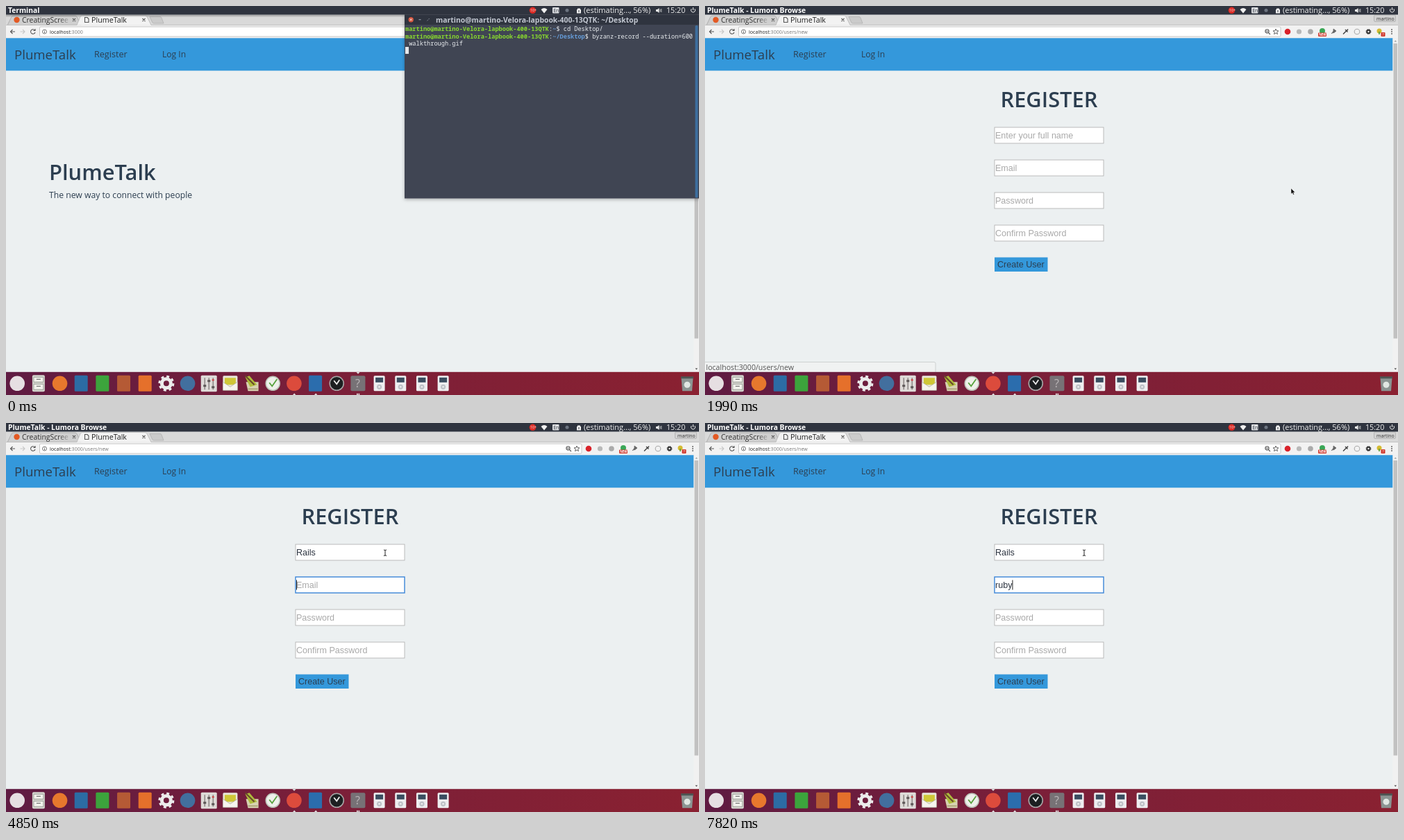
An HTML page for the animation above (8 s loop, 998 by 561 pixels).

```html
<!DOCTYPE html>
<html lang="en">
<head>
<meta charset="utf-8">
<title>Registration walkthrough</title>
<style>
  html, body { margin: 0; width: 100%; height: 100%; overflow: hidden; background: #ecf0f1; }
  svg { display: block; width: 100vw; height: 100vh; }
  text { font-family: "Open Sans", "Noto Sans", sans-serif; white-space: pre; }
  .form text { font: 12.55px "Liberation Sans", Arial, sans-serif; }
  .term text { font: 8.65px "Noto Sans Mono", "DejaVu Sans Mono", monospace; fill: #e8ecef; }
  .user { fill: #87d72f; font-weight: bold; }
  .path { fill: #659bd6; font-weight: bold; }
  .bold { font-weight: bold; }
  .semi { font-weight: 600; }
  .line { fill: none; stroke: #555; stroke-width: 1.1; }
</style>
</head>
<body>
<svg viewBox="0 0 998 561">
  <defs>
    <linearGradient id="dockFill">
      <stop offset="0" stop-color="#5f1b42"/><stop offset=".45" stop-color="#7a1f39"/><stop offset="1" stop-color="#8a2131"/>
    </linearGradient>
    <linearGradient id="tabFade" gradientUnits="userSpaceOnUse" x1="76" x2="93" y1="0" y2="0">
      <stop offset="0" stop-color="#333"/><stop offset="1" stop-color="#333" stop-opacity="0"/>
    </linearGradient>
    <linearGradient id="panelShade" x2="0" y2="1">
      <stop offset="0" stop-opacity=".3"/><stop offset="1" stop-opacity="0"/>
    </linearGradient>
    <filter id="shadow" x="-5%" y="-5%" width="110%" height="115%">
      <feDropShadow dx="0" dy="1.500" stdDeviation="2.500" flood-opacity=".3"/>
    </filter>
  </defs>

  <rect width="998" height="561" fill="#ecf0f1"/>

  <!-- browser frame -->
  <rect y="12.500" width="998" height="16" fill="#d9d9d9"/>
  <path d="M2 28 8 15.500Q9 14 11 14H99Q101 14 102 15.500L108 28Z" fill="#cfcfcf" stroke="#a5a5a5" stroke-width=".8"/>
  <path d="M207 15.500H222Q223.500 15.500 224 17L227 25H213Q211.500 25 211 24Z" fill="#cbcbcb" stroke="#b0b0b0" stroke-width=".8"/>
  <rect y="27.500" width="998" height="19" fill="#f2f2f2"/>
  <path d="M0 27.500H102L107 15.500Q108 13.500 110 13.500H200Q202 13.500 203 15.500L209 27.500H998" fill="#f2f2f2" stroke="#b4b4b4" stroke-width=".7"/>
  <circle cx="15.500" cy="20" r="4.200" fill="#e35a24"/>
  <text x="23" y="24" font-size="10.4" fill="url(#tabFade)">CreatingScree</text>
  <path d="M113.500 16.500H117L119 18.500V23.500H113.500Z" class="line" stroke-width=".9"/>
  <text x="123" y="24" font-size="10.7" fill="#222">PlumeTalk</text>
  <path d="M96 18l4 4m0-4-4 4M196.500 18l4 4m0-4-4 4" class="line"/>
  <path d="M13 37H6.500m3-3-3 3 3 3" class="line" stroke-width="1.300"/>
  <path d="M20.500 37H27m-3-3 3 3-3 3" class="line" style="stroke:#c8c8c8"/>
  <path d="M41.500 35A3.300 3.300 0 1 0 42 38M42 33V35.500H39.500" class="line"/>
  <rect x="48.500" y="30" width="780.500" height="14" rx="1.500" fill="#fff" stroke="#b9b9b9" stroke-width=".8"/>
  <circle cx="55.500" cy="37" r="3" class="line" style="stroke-width:.8"/>
  <path d="M55.500 36.500V39M55.500 34.800V35.600" class="line" style="stroke-width:.9"/>
  <text x="63" y="39.500" font-size="7.1" fill="#222">localhost<tspan id="url" fill="#777"></tspan></text>

  <!-- toolbar buttons -->
  <circle cx="809.500" cy="36.300" r="2.600" class="line"/><path d="M811.500 38.500 814 41M808 36.300H811" class="line"/>
  <path d="M822 33l1.100 2.700 2.900.2-2.300 1.800.8 2.900-2.500-1.600-2.500 1.600.8-2.900-2.300-1.800 2.900-.2Z" class="line" style="stroke-width:.9"/>
  <circle cx="839" cy="37" r="4.300" fill="#d9222a"/>
  <circle cx="855.500" cy="37" r="3.600" fill="#b9b9b9"/>
  <circle cx="872" cy="37" r="3.800" fill="#aaa"/>
  <circle cx="889" cy="36" r="4" fill="#3aa757"/>
  <rect x="883" y="38.500" width="12" height="5.500" rx="1" fill="#d0372c"/>
  <text x="884.300" y="43" font-size="4.4" fill="#fff" class="bold">NEW</text>
  <path d="M902 40l4-5 1 3M905 33l4 3-4 3Z" fill="#666" stroke="#666" stroke-width=".8"/>
  <path d="M919 40.500 923.500 36M922 34l3.500 3.500M924 36l2-2.500" stroke="#444" stroke-width="1.500" fill="none"/>
  <circle cx="939" cy="37" r="3.800" class="line" style="stroke:#aaa"/>
  <circle cx="955.500" cy="37" r="2.200" fill="none" stroke="#333" stroke-width="2"/>
  <circle cx="955.500" cy="37" r="3.500" fill="none" stroke="#333" stroke-width="1" stroke-dasharray="1.375 1.375"/>
  <circle cx="971" cy="36" r="3.500" fill="#d4ba31"/><path d="M971 37v4" stroke="#4d9a3a" stroke-width="1.500"/>
  <rect x="973.500" y="38" width="6" height="6" rx="1" fill="#d0372c"/><text x="975" y="43" font-size="5" fill="#fff">7</text>
  <g fill="#555"><circle cx="989" cy="34" r=".9"/><circle cx="989" cy="37" r=".9"/><circle cx="989" cy="40" r=".9"/></g>
  <rect x="963.500" y="13" width="31" height="9.500" rx="1.500" fill="#d2d2d2" stroke="#aaa" stroke-width=".7"/>
  <text x="967" y="20.500" font-size="6.9" fill="#333">martino</text>

  <!-- page -->
  <rect y="46.300" width="990.500" height="47" fill="#3498db"/>
  <rect x="990.500" y="46.300" width="7.500" height="481.700" fill="#f1f1f1"/>
  <rect x="991.500" y="54" width="5.500" height="425.500" fill="#c1c1c1"/>
  <path d="M992.500 51.500l1.800-2 1.800 2Z" fill="#999"/><path d="M992.500 522.500l1.800 2 1.800-2Z" fill="#444"/>
  <g fill="#2c3e50">
    <text x="12" y="77" font-size="18.6">PlumeTalk</text>
    <text x="127" y="74" font-size="12.6">Register</text>
    <text x="225" y="74" font-size="12.1">Log In</text>
  </g>

  <g id="home" fill="#2c3e50">
    <text x="62" y="251" font-size="30.9" class="semi">PlumeTalk</text>
    <text x="62" y="277" font-size="12.2">The new way to connect with people</text>
    <g class="form">
      <rect x="655" y="245.300" width="59.700" height="27.700" rx="3" fill="#3498db"/><text x="667" y="263.300">Log In</text>
      <rect x="803" y="245.300" width="71.200" height="27.700" rx="3" fill="#3498db"/><text x="815" y="263.300">Register</text>
    </g>
  </g>

  <g id="register" fill="#2c3e50">
    <text x="425.500" y="146" font-size="30.8" class="semi">REGISTER</text>
    <g class="form">
      <g id="fields"></g>
      <rect x="417" y="362.500" width="76.500" height="20.500" fill="#3498db"/>
      <text x="421" y="377.300">Create User</text>
    </g>
    <path id="caret" stroke="#222" stroke-width="1"/>
    <g id="hint">
      <rect x="416.500" y="-.500" width="157.500" height="13.500" fill="#fff" stroke="#c2c2c2" stroke-width=".8"/>
      <text id="hintText" x="421" y="10.300" font-size="9.85" class="bold" fill="#000"></text>
    </g>
  </g>

  <g id="status">
    <path d="M-1 529V513.500H330Q332 513.500 332 515.500V529Z" fill="#f0f2f2" stroke="#c6c9ca" stroke-width=".8"/>
    <text x="1.500" y="524.500" font-size="10.6" fill="#555">localhost:3000/users/new</text>
  </g>

  <!-- terminal, with the panel's shade over the unfocused browser -->
  <g id="terminal" class="term">
    <rect y="12.500" width="998" height="4" fill="url(#panelShade)"/>
    <rect x="574" y="12.500" width="424" height="265" fill="#404552" filter="url(#shadow)"/>
    <rect x="574" y="12.500" width="424" height="14.500" fill="#2f343f"/>
    <rect x="992.500" y="28" width="4" height="248.500" rx="1.500" fill="#3d6f9f"/>
    <circle cx="583.200" cy="19.700" r="3.700" fill="#d5563f"/><path d="M581.700 18.200l3 3m0-3-3 3" stroke="#fff" stroke-width=".8"/>
    <path d="M594.500 19.700h3M606.500 21.300l1-1M608.500 19.200l1-1" stroke="#a4aab7"/>
    <text x="619" y="23.500" style="font:bold 10.4px 'Open Sans',sans-serif;fill:#c3c8d2">martino@martino-Velora-lapbook-400-13QTK: ~/Desktop</text>
    <text x="575" y="36"><tspan class="user">martino@martino-Velora-lapbook-400-13QTK</tspan>:<tspan class="path">~</tspan>$ cd Desktop/</text>
    <text x="575" y="46.500"><tspan class="user">martino@martino-Velora-lapbook-400-13QTK</tspan>:<tspan class="path">~/Desktop</tspan>$ byzanz-record --duration=600</text>
    <text x="580.200" y="57">walkthrough.gif</text>
    <rect x="575" y="59" width="5" height="10" fill="#e4e7ea"/>
  </g>

  <!-- top panel -->
  <rect width="998" height="12.500" fill="#2f343f"/>
  <text id="appTitle" x="3" y="10.200" font-size="10.3" class="bold" fill="#fff"></text>
  <g fill="#f0f0f0">
    <circle cx="758.500" cy="6.300" r="4.800" fill="#dc2b25"/><text x="755" y="8.300" font-size="5.2">10+</text>
    <path d="M770.500 5Q775 1 779.500 5L775 10.500Z"/>
    <rect x="787" y="2" width="9.500" height="8.500" rx="1" fill="#dfe1e4"/><text x="788.200" y="8.900" font-size="7" style="fill:#2f343f">En</text>
    <circle cx="808" cy="6.300" r="2.500" fill="#6c7480"/>
    <path d="M822 5H823V3.500H827V5H828V10.500H822Z"/><path d="M825 6v3" stroke="#2f343f"/>
    <text x="832" y="10.300" font-size="11">(estimating…, 56%)</text>
    <path d="M936 5H938L940.500 3V10L938 8H936Z"/><path d="M942 4.500v4M943.800 4v5" stroke="#ddd" stroke-width=".8"/>
    <text x="951" y="10.300" font-size="10.7">15:20</text>
    <path d="M987.300 4A3 3 0 1 0 991.700 4M989.500 2V6" fill="none" stroke="#f0f0f0"/>
  </g>

  <!-- launcher -->
  <rect y="527.800" width="998" height="33.200" fill="url(#dockFill)"/>
  <g id="dock"></g>
  <path id="activeMark" d="M-2.500 528h5L0 530.700Z" fill="#ddd"/>
  <path d="M413 561l2.200-2.500 2.200 2.500ZM444 561l2.200-2.500 2.200 2.500ZM505 558.800h1.700V561H505ZM507.500 558.800h1.700V561h-1.700Z" fill="#e4dfe1"/>

  <!-- pointers -->
  <g id="pointer" stroke-width=".7">
    <path id="arrow" d="M0 0V8L1.900 6.400 3.200 9.200 4.500 8.600 3.300 5.900 5.700 5.700Z" fill="#111" stroke="#fff" stroke-width=".4"/>
    <path id="hand" d="M-1 0Q0-1 1 0V3.500L4.500 4.500Q5.500 5 5 7L4 10H-1L-3.500 6Q-3.500 5-1 6Z" fill="#fff" stroke="#111"/>
    <path id="beam" d="M-2-4Q0-4 0-3Q0-4 2-4M0-3V4M-2 4.500Q0 4.500 0 3.500Q0 4.500 2 4.500" fill="none" stroke="#222" stroke-width="1"/>
  </g>
</svg>

<script>
const $ = id => document.getElementById(id);
const show = (id, on) => $(id).style.display = on ? '' : 'none';

// Launcher icons, each drawn around its own centre.
const disc = color => `<circle r="10.800" fill="${color}"/>`;
const tile = color => `<rect x="-9.500" y="-11.500" width="19" height="23" rx="1.500" fill="${color}"/>`;
const ring = (r, color, width, extra = '') =>
  `<circle r="${r}" fill="none" stroke="${color}" stroke-width="${width}" ${extra}/>`;
const stroke = (d, color, width = 1.2) => `<path d="${d}" fill="none" stroke="${color}" stroke-width="${width}"/>`;
const clock = (face, rim, hands, mark) => `<circle r="10" fill="${face}"/>` + ring(10, rim, 1.6) + stroke(mark, hands, 1.8);
const player = `<rect x="-8" y="-11" width="16" height="22" rx="1.500" fill="#eeeef0"/>
  <rect x="-5.500" y="-8.500" width="11" height="7" fill="#3a4d60"/><circle cy="5" r="3.600" fill="#bfc2c8"/><circle cy="5" r="1.300" fill="#eee"/>`;
const gear = ring(6.5, '#ececec', 5) + ring(10, '#ececec', 3, 'stroke-dasharray="3.927 3.927"');
const cabinet = `<rect x="-9" y="-12" width="18" height="24" rx="2" fill="#d3d4cd"/>
  <path d="M-7-9H7V-2H-7ZM-7 1H7V9H-7Z" fill="#f2f2ec" stroke="#8f918b" stroke-width=".8"/>` + stroke('M-3-6H3M-3 4H3', '#777');
const mixer = `<rect x="-11.500" y="-11.500" width="23" height="23.500" rx="1.500" fill="#dedbd8"/>`
  + stroke('M-6-8V9M0-8V9M6-8V9', '#77706f') + `<path d="M-8 2h4v3h-4ZM-2-5h4v3h-4ZM4 4h4v3H4Z" fill="#5c5656"/>`
  + `<circle cx="6" cy="-5" r="1.500" fill="#c44"/>`;
const mail = `<rect x="-10.500" y="-11" width="21" height="21" rx="1.500" fill="#e9e7d9"/>
  <path d="M-8-8H8V2H-8Z" fill="#cfc737"/><path d="M-10.500-2 0 5 10.500-2V10H-10.500Z" fill="#f6f5ee" stroke="#aaa698" stroke-width=".7"/>`;
const cleaner = `<path d="M-8-2H10V11H-5Z" fill="#d7d2b0"/><path d="M-9-9-3-11 8 2-2 5Z" fill="#aebb3c"/>`
  + stroke('M-9-11 4 2', '#68472b', 2) + stroke('M-5 8H9', '#9a8f60');
const help = `<rect x="-10.500" y="-11" width="21" height="22" rx="2" fill="#777276"/>
  <text x="-4" y="6" font-size="16" fill="#bbb6b8">?</text>`;
const bin = `<path d="M-8.500-8H8.500L7 11H-7Z" fill="#8b9492"/><path d="M-9-10H9V-7H-9Z" fill="#4d5654"/>
  <circle cy="2" r="4.500" fill="#e1e7e3"/>`;

const icons = [
  disc('#e6dfe2'), cabinet, disc('#e7782d'), tile('#2c6ca4'), tile('#3ca43c'), tile('#b55a35'), tile('#e5702b'),
  gear, disc('#426f9e'), mixer, mail, cleaner, clock('#eef0ea', '#bcc4b8', '#55a13b', 'M-5-1-1 4 6-6'),
  disc('#dc4b3c'), tile('#2b6dad'), clock('#1c1f21', '#a7a7a7', '#eee', 'M-4-4 0 1 4-5'), help,
  player, player, player, player
];
const place = (icon, x) => `<g transform="translate(${x} 544.300)">${icon}</g>`;
$('dock').innerHTML = icons.map((icon, i) => place(icon, 16.2 + 30.67 * i)).join('') + place(bin, 981);

const placeholders = ['Enter your full name', 'Email', 'Password', 'Confirm Password'];
const rowTop = i => 175 + 47 * i;
$('fields').innerHTML = placeholders.map((_, i) =>
  `<rect x="417" y="${rowTop(i)}" width="157" height="23" fill="#fff"/><text x="418" y="${rowTop(i) + 15.7}"></text>`).join('');
const boxes = [...$('fields').querySelectorAll('rect')];
const labels = [...$('fields').querySelectorAll('text')];

// [start ms, focused row, text in that row, caret, suggestion list]
const typing = [
  [0, -1, '', 0, 0],
  [3230, 0, '', 1, 0], [3850, 0, '', 0, 0], [3930, 0, 'R', 1, 0], [4000, 0, 'R', 1, 1], [4110, 0, 'Ra', 1, 1],
  [4210, 0, 'Rai', 1, 1], [4330, 0, 'Rail', 1, 1], [4480, 0, 'Rails', 1, 1], [4560, 0, 'Rails', 1, 0],
  [4850, 1, '', 1, 0], [5430, 1, '', 0, 0], [5510, 1, 'r', 1, 0], [5590, 1, 'r', 1, 1], [5690, 1, 'ra', 1, 1],
  [5770, 1, 'rai', 1, 1], [5850, 1, 'rail', 1, 1], [5930, 1, 'rails', 1, 1],
  [6200, 1, 'rail', 1, 1], [6400, 1, 'rai', 1, 1], [6500, 1, 'ra', 1, 1], [6610, 1, 'r', 1, 1],
  [7070, 1, 'r', 0, 1], [7140, 1, '', 1, 0], [7230, 1, 'r', 1, 0], [7320, 1, 'r', 1, 1],
  [7560, 1, 'ru', 1, 1], [7640, 1, 'ru', 1, 0], [7700, 1, 'rub', 1, 0], [7820, 1, 'ruby', 1, 0]
];

function drawForm(t) {
  const [, focus, text, caret, hint] = typing.findLast(step => step[0] <= t);
  const values = [focus === 1 ? 'Rails' : '', '', '', ''];
  if (focus >= 0) values[focus] = text;
  boxes.forEach((box, i) => {
    box.setAttribute('stroke', i === focus ? '#3b85d8' : '#b4b4b4');
    box.setAttribute('stroke-width', i === focus ? 1.4 : 0.9);
    labels[i].textContent = values[i] || placeholders[i];
    labels[i].setAttribute('fill', values[i] ? '#2c3440' : '#a9a9a9');
  });
  show('caret', caret);
  show('hint', hint);
  if (focus < 0) return;
  const x = 418.5 + (text ? labels[focus].getComputedTextLength() : 0);
  $('caret').setAttribute('d', `M${x} ${rowTop(focus) + 4.5}v14`);
  $('hint').setAttribute('transform', `translate(0 ${rowTop(focus) + 24})`);
  $('hintText').textContent = focus ? 'robin@example.com' : 'Rails';
}

const progress = (t, from, to) => {
  const p = Math.min(1, Math.max(0, (t - from) / (to - from)));
  return p * p * (3 - 2 * p);
};

function drawPointer(t) {
  const toButton = progress(t, 1200, 1640), toField = progress(t, 2290, 3120);
  const x = 874 - 30 * toButton - 298 * toField;
  const y = 318 - 55 * toButton - 76 * toField;
  const overButton = t < 1990 && y < 273;
  const overField = x < 574 && y < 198;
  show('pointer', t >= 1250);
  $('pointer').setAttribute('transform', `translate(${x} ${y})`);
  show('hand', overButton);
  show('beam', overField);
  show('arrow', !overButton && !overField);
}

function draw(t) {
  const browserActive = t >= 650;
  show('terminal', t < 590);
  $('terminal').setAttribute('opacity', t < 510 ? 1 : 0.4);
  $('appTitle').textContent = browserActive ? 'PlumeTalk - Lumora Browse' : 'Terminal';
  $('activeMark').setAttribute('transform', `translate(${browserActive ? 415 : 507} 0)`);
  $('url').textContent = t < 1780 ? ':3000' : ':3000/users/new';
  show('home', t < 1990);
  show('register', t >= 1990);
  show('status', t >= 1560 && t < 2400);
  if (t >= 1990) drawForm(t);
  drawPointer(t);
}

const start = performance.now();
function tick() {
  draw((performance.now() - start) % 8000);
  requestAnimationFrame(tick);
}
tick();
</script>
</body>
</html>
```
